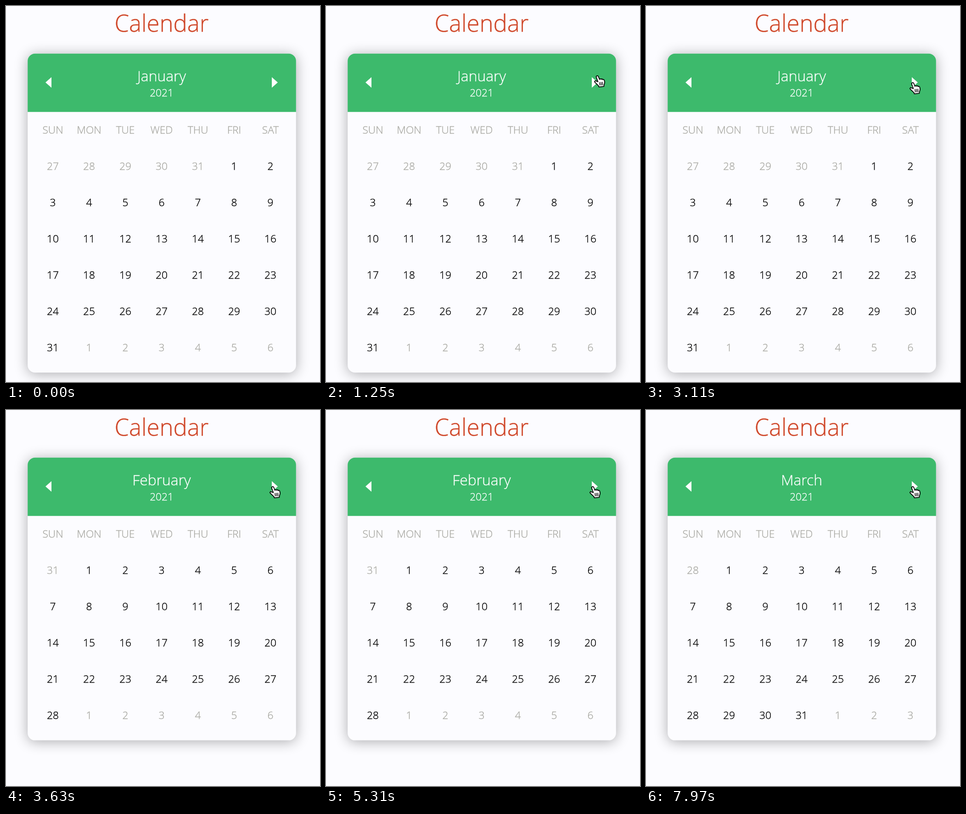
Animation, 684 px wide and 819 px high, one loop 7.99 s. Source, as an HTML page with a canvas:

```html
<!DOCTYPE html>
<html lang="en">
<head>
<meta charset="utf-8">
<title>Calendar</title>
<style>
  html, body { margin: 0; width: 100%; height: 100%; overflow: hidden; background: #fcfcff; }
  canvas { display: block; }
</style>
</head>
<body>
<canvas id="stage" width="684" height="819"></canvas>
<script>
const ctx = document.getElementById('stage').getContext('2d');

const LOOP = 7990;
const YEAR = 2021;
const MONTHS = ['January', 'February', 'March'];
const MONTH_STARTS = [0, 3340, 5400];
const WEEKDAYS = ['SUN', 'MON', 'TUE', 'WED', 'THU', 'FRI', 'SAT'];
const CELL = 79, ROW = 78.9;
const CARD = { x: 47.2, y: 103.7, width: 584.6, radius: 16 };
const CENTER = 339;
const GREEN = '#3dba6c', PAPER = '#fcfcff', MUTED = '#aaaaa4';

// Top left corner of the pointer: [time, x, y]
const POINTER_PATH = [
  [250, 686, 232], [720, 628, 180], [1050, 584, 151],
  [1300, 584, 151], [1900, 573, 166], [2450, 573, 166], [2700, 574, 166]
];

const HAND = new Path2D(
  'M8.4 14 L4.8 4.4 C3.8 0.8 8 -0.4 9.4 2.8 L11.8 9 C12.6 7.2 14.8 7.2 15.4 8.8 ' +
  'C16.4 7.4 18.4 7.8 19 9.6 C20.2 8.4 22 9.2 22.4 11.2 ' +
  'C23.4 14.6 23.2 17.6 21.6 20.6 L21.4 24.2 L10.6 25.4 L9.6 22.6 ' +
  'C6.4 20.2 4.2 17.4 1.6 15 C0.2 12.6 2.8 11.2 4.8 12.6 Z'
);
const KNUCKLES = new Path2D('M12 15.5 l.7 6 M15.2 15.2 l.5 6 M18.3 15 l.3 6');

// The thin outline gives the light face slightly fuller stems.
function text(string, x, baseline, size, color) {
  ctx.font = `300 ${size}px "Open Sans", sans-serif`;
  ctx.textAlign = 'center';
  ctx.fillStyle = ctx.strokeStyle = color;
  ctx.lineWidth = 0.4;
  ctx.lineJoin = 'round';
  ctx.fillText(string, x, baseline);
  ctx.strokeText(string, x, baseline);
}

function roundedBox(height, corners, color) {
  ctx.beginPath();
  ctx.roundRect(CARD.x, CARD.y, CARD.width, height, corners);
  ctx.fillStyle = color;
  ctx.fill();
}

function arrow(tipX, baseX) {
  ctx.beginPath();
  ctx.moveTo(tipX, 166.5);
  ctx.lineTo(baseX, 155);
  ctx.lineTo(baseX, 178);
  ctx.fillStyle = '#fff';
  ctx.fill();
}

function drawCalendar(month) {
  const { radius } = CARD;
  const offset = new Date(YEAR, month, 1).getDay();
  const length = new Date(YEAR, month + 1, 0).getDate();
  const rows = Math.ceil((offset + length) / 7);

  ctx.save();
  ctx.shadowColor = 'rgba(0, 0, 0, .32)';
  ctx.shadowBlur = 29;
  ctx.shadowOffsetY = 3;
  roundedBox(221.4 + ROW * rows, radius, PAPER);
  ctx.restore();
  roundedBox(127, [radius, radius, 0, 0], GREEN);

  text(MONTHS[month], CENTER, 164, 31.8, '#fff');
  text(YEAR, CENTER, 197, 22.6, '#fff');
  arrow(86, 99);
  arrow(592, 579);

  const columnX = column => CENTER + (column - 3) * CELL;
  WEEKDAYS.forEach((name, i) => text(name, columnX(i), 278, 22.7, MUTED));
  for (let i = 0; i < rows * 7; i++) {
    const day = i - offset + 1;
    const inMonth = day >= 1 && day <= length;
    const label = new Date(YEAR, month, day).getDate();
    text(label, columnX(i % 7), 357 + ROW * Math.floor(i / 7), 22.7, inMonth ? '#000' : MUTED);
  }
}

function drawPointer(time) {
  if (time < POINTER_PATH[0][0]) return;
  const next = POINTER_PATH.findIndex(point => point[0] > time);
  const to = next < 0 ? POINTER_PATH.at(-1) : POINTER_PATH[next];
  const from = next < 0 ? to : POINTER_PATH[next - 1];
  const progress = to === from ? 0 : (time - from[0]) / (to[0] - from[0]);
  const eased = progress * progress * (3 - 2 * progress);
  const mix = axis => from[axis] + (to[axis] - from[axis]) * eased;

  ctx.save();
  ctx.translate(Math.round(mix(1)), Math.round(mix(2)));
  ctx.lineJoin = ctx.lineCap = 'round';
  ctx.fillStyle = '#fff';
  ctx.strokeStyle = '#000';
  ctx.lineWidth = 1.8;
  ctx.fill(HAND);
  ctx.stroke(HAND);
  ctx.lineWidth = 1.5;
  ctx.stroke(KNUCKLES);
  ctx.restore();
}

function draw(now) {
  const time = now % LOOP;
  ctx.fillStyle = PAPER;
  ctx.fillRect(0, 0, 684, 819);
  text('Calendar', 339, 56, 50.9, '#d0482a');
  drawCalendar(MONTH_STARTS.findLastIndex(start => time >= start));
  drawPointer(time);
}

const start = performance.now();
function tick() {
  draw(performance.now() - start);
  requestAnimationFrame(tick);
}
tick();
</script>
</body>
</html>
```
